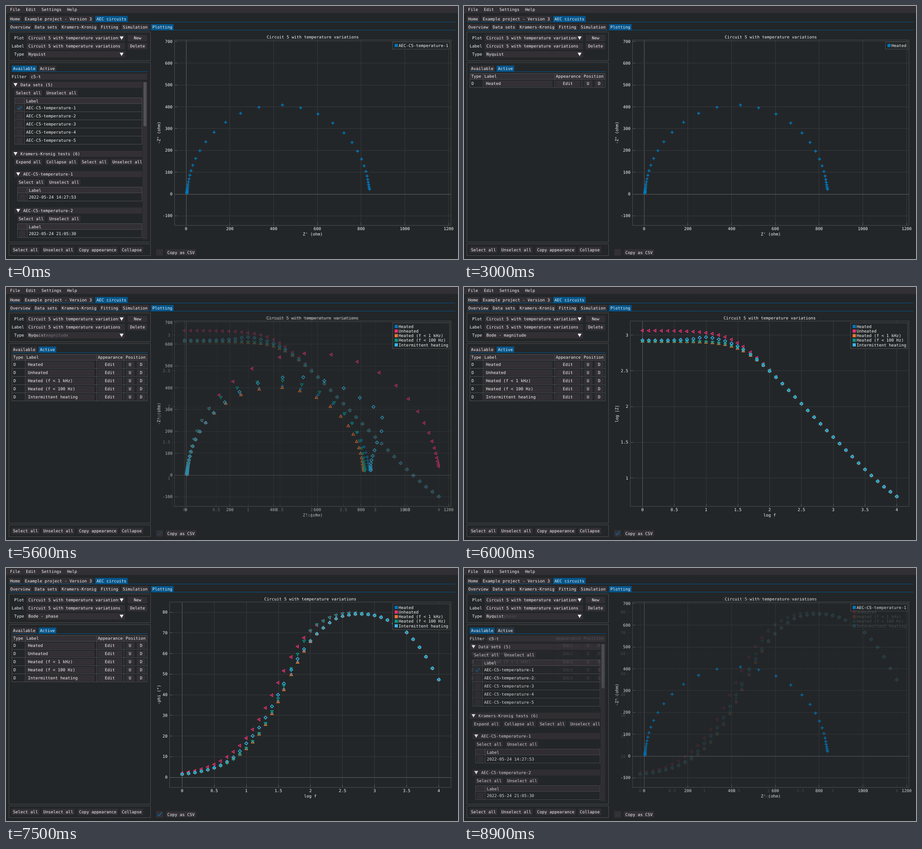
Animation of 999x561 px, one loop 9 s. Source, as an HTML page with a canvas:

```html
<!DOCTYPE html>
<html lang="en">
<head>
<meta charset="utf-8">
<title>Plotting tab</title>
<style>
html, body { margin: 0; width: 100%; height: 100%; overflow: hidden; background: #232628; }
canvas { display: block; width: 999px; height: 561px; }
</style>
</head>
<body>
<canvas id="stage" width="999" height="561"></canvas>
<script>
const W = 999, H = 561;
const BG = '#232628', WIDGET = '#333035', ACCENT = '#03558b', BORDER = '#4b4c4e';
const GRID = '#363a3c', ZERO = '#5f6263', TEXT = '#f4f4f4', DIM = '#858487';
const CHAR = 5.5;
const FONT = '9.135px "DejaVu Sans Mono", monospace';

let g;

// ---------- drawing helpers ----------
function box(x0, y0, x1, y1, fill = WIDGET) {
  g.fillStyle = fill;
  g.fillRect(x0, y0, x1 - x0, y1 - y0);
}
function line(x0, y0, x1, y1, color = BORDER) {
  g.strokeStyle = color;
  g.lineWidth = 1;
  g.beginPath();
  g.moveTo(x0, y0);
  g.lineTo(x1, y1);
  g.stroke();
}
function frame(x0, y0, x1, y1) {
  g.strokeStyle = BORDER;
  g.lineWidth = 1;
  g.strokeRect(x0, y0, x1 - x0, y1 - y0);
}
function text(s, x, y, align = 'left', color = TEXT) {
  g.fillStyle = color;
  g.textAlign = align;
  g.fillText(s, x, Math.round(y + 3));
}
function button(s, x, y, fill = WIDGET) {
  box(x - 3, y - 7, x + s.length * CHAR + 3, y + 6.5, fill);
  text(s, x, y);
}
function buttons(list, y) {
  for (const [s, x] of list) button(s, x, y);
}
function tabs(list, active, y, x0, x1) {
  for (const [s, x] of list) button(s, x, y, s === active ? ACCENT : WIDGET);
  line(x0, y + 6.5, x1, y + 6.5, ACCENT);
}
function arrow(x, y) {
  g.fillStyle = TEXT;
  g.beginPath();
  g.moveTo(x - 4.3, y - 3.5);
  g.lineTo(x + 4.3, y - 3.5);
  g.lineTo(x, y + 4);
  g.fill();
}
function checkbox(x, y, on) {
  box(x - 7.5, y - 7, x + 7.5, y + 7.5);
  if (!on) return;
  g.strokeStyle = '#0868a8';
  g.lineWidth = 1.7;
  g.beginPath();
  g.moveTo(x - 4.5, y);
  g.lineTo(x - 1.3, y + 3.3);
  g.lineTo(x + 4.7, y - 3.6);
  g.stroke();
}
function header(s, x, y) {
  box(x, y - 7, 301, y + 6.5);
  arrow(x + 8, y - 0.5);
  text(s, x + 19, y);
}
function grid(x0, x1, top, rows, cols) {
  box(x0, top, x1, top + 13);
  for (let i = 0; i <= rows; i++) line(x0, top + 13 + 18 * i, x1, top + 13 + 18 * i);
  const bottom = top + 13 + 18 * rows;
  for (const x of cols) line(x, top, x, bottom);
  frame(x0, top, x1, bottom);
}

// ---------- measured series ----------
const X0 = 398, Y0 = 417, OHM = 0.4835;
const KNOTS = [0, 4, 6, 8, 10, 12, 14, 16, 18, 20];
const HIGH = [22, 24, 26, 28, 32, 36, 38, 40];
const HIGH_MAG = [2.32, 2.133, 1.945, 1.757, 1.39, 1.035, 0.877, 0.741];
const HIGH_PHI = [72.4, 76.9, 78.7, 79.1, 76.2, 66.9, 58.4, 47.3];
const COLD_GAIN = [3.4, 1.7, 0.9, 0.4, 0, 0, 0, 0];

const SERIES = [
  { name: 'Heated', color: '#0077bb', mark: 'plus',
    xs: [803.5, 800.5, 798, 791.5, 777, 747, 689.5, 611, 518.5, 460],
    ys: [406.5, 391, 377, 354.5, 322, 281.5, 239.5, 219.5, 238, 280] },
  { name: 'Unheated', color: '#ee3377', mark: 'left', cold: true,
    xs: [956.5, 950, 942, 924.5, 890, 825, 719, 605, 502, 449],
    ys: [397.5, 369, 342, 301.5, 248, 190, 150, 156, 209.5, 269] },
  { name: 'Heated (f < 1 kHz)', color: '#ee7733', mark: 'up',
    xs: [791, 788.5, 786, 780, 767.5, 740, 686, 610.5, 519.5, 460],
    ys: [407, 392.5, 379, 357, 327, 287, 245.5, 223.5, 239.5, 280] },
  { name: 'Heated (f < 100 Hz)', color: '#009988', mark: 'down', cold: true,
    xs: [793.5, 791.5, 790, 786, 775, 749, 693, 611.5, 511, 448.5],
    ys: [407, 392.5, 379, 357, 322, 280, 233, 207.5, 223.5, 269.5] },
  { name: 'Intermittent heating', color: '#33bbee', mark: 'diamond',
    xs: [806.5, 806.5, 810.5, 820, 831.5, 782, 703.5, 611.5, 516, 459],
    ys: [406.5, 391, 374.5, 345, 289.5, 245.5, 208, 200.5, 232.5, 279] }
];

// Log frequency of sample i; two samples sit slightly off the even spacing.
const logF = i => i === 15 ? 1.495 : i === 16 ? 1.585 : i / 10;

// Cubic Hermite interpolation; each slope weighs its two neighbours by distance.
function spline(xs, ys, x) {
  const last = xs.length - 1;
  let k = 0;
  while (k < last - 1 && x > xs[k + 1]) k++;
  const rise = i => (ys[i + 1] - ys[i]) / (xs[i + 1] - xs[i]);
  const slope = i => {
    if (i === 0) return rise(0);
    if (i === last) return rise(last - 1);
    const a = xs[i] - xs[i - 1], b = xs[i + 1] - xs[i];
    return (rise(i - 1) * b + rise(i) * a) / (a + b);
  };
  const h = xs[k + 1] - xs[k], u = (x - xs[k]) / h, v = 1 - u;
  return ys[k] * v * v * (1 + 2 * u) + ys[k + 1] * u * u * (3 - 2 * u) +
         h * u * v * (slope(k) * v - slope(k + 1) * u);
}

for (const s of SERIES) {
  const lf = [...KNOTS, ...HIGH].map(logF), mag = [], phi = [];
  s.xs.forEach((x, i) => {
    const re = (x - X0) / OHM, im = (Y0 - s.ys[i]) / OHM;
    mag.push(Math.log10(Math.hypot(re, im)));
    phi.push(Math.log(Math.atan2(im, re) * 180 / Math.PI));
  });
  HIGH_MAG.forEach((m, i) => {
    mag.push(m);
    phi.push(Math.log(HIGH_PHI[i] + (s.cold ? COLD_GAIN[i] : 0)));
  });
  s.points = Array.from({ length: 41 }, (_, i) => {
    const f = logF(i), m = spline(lf, mag, f), p = Math.exp(spline(lf, phi, f));
    const z = 10 ** m, a = p * Math.PI / 180;
    return { f, m, p, re: z * Math.cos(a), im: z * Math.sin(a) };
  });
}

// ---------- plots ----------
const range = (a, b, step) =>
  Array.from({ length: Math.round((b - a) / step) + 1 }, (_, i) => a + i * step);

const PLOTS = {
  nyquist: { type: 'Nyquist', left: 372.5, xlabel: "Z' (ohm)", ylabel: '-Z" (ohm)',
    xt: range(0, 1200, 200), yt: range(-100, 700, 100),
    px: v => X0 + v * OHM, py: v => Y0 - v * OHM, at: p => [p.re, p.im] },
  magnitude: { type: 'Bode - magnitude', left: 367.5, xlabel: 'log f', ylabel: 'log |Z|',
    xt: range(0, 4, 0.5), yt: range(1, 3, 0.5),
    px: v => 394.5 + v * 140.5, py: v => 582 - v * 158.5, at: p => [p.f, p.m] },
  phase: { type: 'Bode - phase', left: 361.5, xlabel: 'log f', ylabel: '-phi (°)',
    xt: range(0, 4, 0.5), yt: range(0, 80, 10),
    px: v => 389.3 + v * 141.8, py: v => 464 - v * 4.575, at: p => [p.f, p.p] }
};
const TOP = 75.5, BOTTOM = 486.5, RIGHT = 983.5;

const TURN = { up: -90, down: 90, left: 180 };
function marker(kind, x, y, color) {
  const r = 3.4;
  g.strokeStyle = color;
  g.lineWidth = kind === 'plus' ? 1.8 : 1.5;
  g.beginPath();
  if (kind === 'plus') {
    g.moveTo(x - r, y); g.lineTo(x + r, y);
    g.moveTo(x, y - r); g.lineTo(x, y + r);
  } else {
    const n = kind === 'diamond' ? 4 : 3, start = (TURN[kind] || 0) * Math.PI / 180;
    for (let i = 0; i < n; i++) {
      const a = start + i * 2 * Math.PI / n;
      g.lineTo(x + r * Math.cos(a), y + r * Math.sin(a));
    }
    g.closePath();
  }
  g.stroke();
}

function legend(names) {
  const width = Math.max(...names.map(n => n.length)) * CHAR;
  const x = 978 - width;
  box(x - 13.5, 79.5, 980.5, 85.5 + names.length * 10.2, BG);
  frame(x - 13.5, 79.5, 980.5, 85.5 + names.length * 10.2);
  names.forEach((n, i) => {
    const y = 87.7 + i * 10.2;
    box(x - 9, y - 3.7, x - 2, y + 3.3, SERIES[i].color);
    text(n, x - 0.3, y);
  });
}

function plot(p, names) {
  const mid = (p.left + RIGHT) / 2, snap = v => Math.floor(v) + 0.5;
  text('Circuit 5 with temperature variations', mid, 69, 'center');
  for (const v of p.xt) {
    const x = snap(p.px(v));
    line(x, TOP, x, BOTTOM, v ? GRID : ZERO);
    line(x, BOTTOM - 6, x, BOTTOM, ZERO);
    text(String(v), p.px(v), 493.5, 'center');
  }
  for (const v of p.yt) {
    const y = snap(p.py(v));
    line(p.left, y, RIGHT, y, v ? GRID : ZERO);
    line(p.left, y, p.left + 6, y, ZERO);
    text(String(v), p.left - 4.5, p.py(v), 'right');
  }
  frame(p.left, TOP, RIGHT, BOTTOM);
  text(p.xlabel, mid, 505.5, 'center');
  g.save();
  g.translate(337.5, 281);
  g.rotate(-Math.PI / 2);
  text(p.ylabel, 0, 0, 'center');
  g.restore();
  names.forEach((_, i) => {
    const s = SERIES[i];
    for (const q of s.points) {
      const [x, y] = p.at(q);
      marker(s.mark, p.px(x), p.py(y), s.color);
    }
  });
  legend(names);
}

// ---------- window ----------
function shell(type) {
  box(0, 0, W, H, BG);
  box(0, 0, W, 15.5);
  [['File', 9], ['Edit', 44], ['Settings', 78.5], ['Help', 135]].forEach(([s, x]) => text(s, x, 8));
  tabs([['Home', 9], ['Example project - Version 3', 41.5], ['AEC circuits', 200]],
    'AEC circuits', 29, 6, 993);
  tabs([['Overview', 9.5], ['Data sets', 63.5], ['Kramers-Kronig', 123], ['Fitting', 209.5],
    ['Simulation', 258], ['Plotting', 323.5]], 'Plotting', 47, 6, 993);

  frame(6.5, 57.5, 319.5, 121.5);
  frame(6.5, 125.5, 319.5, 523.5);
  frame(6.5, 527.5, 319.5, 553.5);
  const title = 'Circuit 5 with temperature variations';
  [['Plot', title], ['Label', title], ['Type', type]].forEach(([label, value], i) => {
    const y = 71 + 18 * i;
    text(label, 40, y, 'right');
    box(46, y - 7, 263, y + 7);
    g.save();
    g.beginPath();
    g.rect(46, y - 7, i === 1 ? 217 : 203, 14);
    g.clip();
    text(value, 49.5, y);
    g.restore();
    if (i !== 1) arrow(255.5, y);
  });
  [['New', 71], ['Delete', 89]].forEach(([s, y]) => {
    box(269, y - 7, 312, y + 7);
    text(s, 290.7, y, 'center');
  });
  buttons([['Select all', 15.5], ['Unselect all', 82.5], ['Copy appearance', 161.5],
    ['Collapse', 256]], 541);
  button('Copy as CSV', 356.5, 546.5);
}

function panelTabs(active) {
  tabs([['Available', 15.5], ['Active', 75]], active, 139, 13, 313);
}

function checkTable(x, top, rows) {
  grid(x + 0.5, 300.5, top, rows.length, [x + 21.5]);
  text('Label', x + 25.5, top + 7);
  rows.forEach((s, i) => {
    const y = top + 22.5 + 18 * i;
    checkbox(x + 11, y, x === 19 && i === 0);
    text(s, x + 25.5, y);
  });
}

function available() {
  panelTabs('Available');
  text('Filter', 12.5, 157);
  box(52, 150, 312, 163.5);
  text('c5-t', 55, 157);
  box(302, 168, 312, 517);
  box(304, 169, 310.5, 266.5, '#525255');

  g.save();
  g.beginPath();
  g.rect(12, 166, 289, 351);
  g.clip();
  const name = i => 'AEC-C5-temperature-' + i;
  header('Data sets (5)', 13, 175);
  buttons([['Select all', 22], ['Unselect all', 89.5]], 193);
  checkTable(19, 203.5, [1, 2, 3, 4, 5].map(name));
  header('Kramers-Kronig tests (6)', 13, 328);
  buttons([['Expand all', 22], ['Collapse all', 89.5], ['Select all', 167.5],
    ['Unselect all', 235]], 346);
  ['2022-05-24 14:27:53', '2022-05-24 21:05:30'].forEach((stamp, i) => {
    const y = 373 + 81 * i;
    header(name(i + 1), 19, y);
    buttons([['Select all', 28], ['Unselect all', 95.5]], y + 18);
    checkTable(25, y + 28.5, [stamp]);
  });
  g.restore();
}

function active(names, color) {
  panelTabs('Active');
  grid(13, 312, 149.5, names.length, [42.5, 200.5, 260.5]);
  [['Type', 16], ['Label', 45], ['Appearance', 203], ['Position', 264.5]]
    .forEach(([s, x]) => text(s, x, 156));
  names.forEach((s, i) => {
    const y = 172 + 18 * i;
    text('D', 16.5, y);
    box(45, y - 7, 195.5, y + 7);
    text(s, 48.5, y, 'left', color);
    box(203, y - 7, 257, y + 7);
    text('Edit', 229.5, y, 'center');
    box(264.5, y - 7, 284, y + 7);
    text('U', 274, y, 'center');
    box(289, y - 7, 308.5, y + 7);
    text('D', 298.7, y, 'center');
  });
}

// ---------- scenes ----------
const RAW = ['AEC-C5-temperature-1'], ALL = SERIES.map(s => s.name);
const SCENES = [
  { plot: 'nyquist', names: RAW, list: true },
  { plot: 'nyquist', names: RAW, color: DIM },
  { plot: 'nyquist', names: ['Heated'] },
  { plot: 'nyquist', names: ALL },
  { plot: 'magnitude', names: ALL, csv: true },
  { plot: 'phase', names: ALL, csv: true }
].map(scene => {
  const layer = document.createElement('canvas');
  layer.width = W;
  layer.height = H;
  g = layer.getContext('2d');
  g.font = FONT;
  g.textRendering = 'geometricPrecision';
  const p = PLOTS[scene.plot];
  shell(p.type);
  if (scene.list) available();
  else active(scene.names, scene.color);
  checkbox(339.5, 546, scene.csv);
  plot(p, scene.names);
  return layer;
});

// Each scene holds for a second, then blends into the next in six steps.
const HOLD = 1000, STEP = 100, STEPS = 6, SLOT = 1500, LOOP = 9000;
const stage = document.getElementById('stage').getContext('2d');
const begin = performance.now();

function render(now) {
  const t = Math.max(0, now - begin) % LOOP;
  const k = Math.floor(t / SLOT), u = t - k * SLOT;
  const mix = u < HOLD ? 0 : (Math.floor((u - HOLD) / STEP) + 1) / STEPS;
  stage.globalAlpha = 1;
  stage.drawImage(SCENES[k], 0, 0);
  if (mix) {
    stage.globalAlpha = mix;
    stage.drawImage(SCENES[(k + 1) % SCENES.length], 0, 0);
  }
  requestAnimationFrame(render);
}
render(begin);
</script>
</body>
</html>
```
